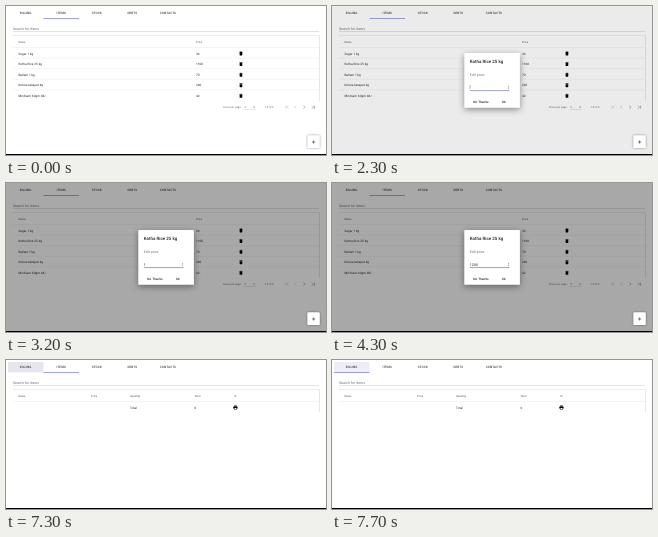
These frames come from a looping animation (320x149 px, 8 s). An HTML page:

```html
<!DOCTYPE html>
<html lang="en">
<head>
<meta charset="utf-8">
<title>Shop items</title>
<style>
  html, body { margin: 0; width: 100%; height: 100%; overflow: hidden; background: #fff; }
  svg { display: block; width: 100%; height: 100%; }
  text { font: 400 3.11px Roboto, Arial, sans-serif; fill: #212121; text-rendering: geometricPrecision; white-space: pre; }
  .tabs text { font-weight: 500; letter-spacing: .06px; text-anchor: middle; fill: #444; }
  .head text { font-size: 2.67px; font-weight: 500; fill: #6c6c6c; }
  .pager text { font-size: 2.67px; fill: #666; }
  .body text { letter-spacing: .03px; }
  .large { font-size: 3.55px; fill: #6f6f6f; }
  .title { font-size: 4.44px; font-weight: 500; }
  .button { font-weight: 500; letter-spacing: .06px; }
  .rule { stroke: #dedede; stroke-width: .3; fill: none; }
  .card { fill: #fff; filter: drop-shadow(0 .6px .7px rgba(0,0,0,.38)); }
  .fab { fill: #fff; filter: drop-shadow(0 .8px 1px rgba(0,0,0,.42)); }
  .paper { fill: #fff; filter: drop-shadow(0 2px 3px rgba(0,0,0,.4)); }

  .items, .billing, .backdrop, .dialog, .caret, .old, .new, .hover, .key { animation: 8s step-end infinite; }
  .items { animation-name: items; }
  .billing { animation-name: billing; }
  .backdrop { animation-name: dim; }
  .dialog { animation-name: dialog; }
  .caret { animation-name: caret; }
  .old { animation-name: old; }
  .new { animation-name: new; }
  .hover { animation-name: hover; }
  .key1 { animation-name: key1; }
  .key2 { animation-name: key2; }
  .key3 { animation-name: key3; }
  .key4 { animation-name: key4; }
  .marker { animation: slide 8s linear infinite; }

  @keyframes items { 0% { opacity: 1 } 91.25%, 100% { opacity: 0 } }
  @keyframes billing { 0% { opacity: 0 } 91.25%, 100% { opacity: 1 } }
  @keyframes dim {
    0% { opacity: 0 } 28.75% { opacity: .08 } 30% { opacity: .3 }
    31.25% { opacity: .33 } 32.5% { opacity: .34 } 57.5%, 100% { opacity: 0 }
  }
  @keyframes dialog { 0% { opacity: 0 } 28.75% { opacity: 1 } 57.5%, 100% { opacity: 0 } }
  @keyframes caret { 0% { opacity: 1 } 40%, 100% { opacity: 0 } }
  @keyframes old { 0% { opacity: 1 } 57.5%, 100% { opacity: 0 } }
  @keyframes new { 0% { opacity: 0 } 57.5%, 100% { opacity: 1 } }
  @keyframes key1 { 0% { visibility: hidden } 40%, 100% { visibility: visible } }
  @keyframes key2 { 0% { visibility: hidden } 46.25%, 100% { visibility: visible } }
  @keyframes key3 { 0% { visibility: hidden } 51.25%, 100% { visibility: visible } }
  @keyframes key4 { 0% { visibility: hidden } 53.75%, 100% { visibility: visible } }
  @keyframes hover {
    0% { fill: #fff } 91.25% { fill: #e6e6ee } 92.5% { fill: #e7e8f1 }
    95% { fill: #eaebf5 } 96.25%, 100% { fill: #ecedf6 }
  }
  @keyframes slide {
    0% { transform: none }
    91.25% { transform: none; animation-timing-function: cubic-bezier(.4,0,.2,1) }
    95%, 100% { transform: translateX(-35.6px) }
  }
</style>
</head>
<body>
<svg viewBox="0 0 320 149" preserveAspectRatio="none">
  <defs>
    <symbol id="trash" viewBox="0 0 24 24">
      <path d="M6 19c0 1.1.9 2 2 2h8c1.1 0 2-.9 2-2V7H6zM19 4h-3.5l-1-1h-5l-1 1H5v2h14z"/>
    </symbol>
    <symbol id="print" viewBox="0 0 24 24">
      <path d="M19 8H5c-1.7 0-3 1.3-3 3v6h4v4h12v-4h4v-6c0-1.7-1.3-3-3-3zm-3 11H8v-5h8zM18 3H6v4h12z"/>
    </symbol>
  </defs>
  <rect width="320" height="149" fill="#fff"/>

  <g class="tabs">
    <rect class="hover" x="2" y="2" width="35.5" height="10.3"/>
    <text x="19.6" y="8.2">BILLING</text>
    <text x="55.2" y="8.2">ITEMS</text>
    <text x="90.8" y="8.2">STOCK</text>
    <text x="126.3" y="8.2">DEBTS</text>
    <text x="161.9" y="8.2">CONTACTS</text>
    <rect class="marker" x="37.4" y="12" width="35.6" height=".5" fill="#3f51b5"/>
  </g>
  <text class="large" x="7" y="24">Search for items</text>
  <path d="M7 25.7H313" stroke="#888" stroke-width=".3"/>

  <g class="items">
    <rect class="card" x="7" y="29.3" width="306.5" height="65.7" rx=".8"/>
    <g class="head">
      <text x="12.4" y="37">Name</text>
      <text x="190" y="37">Price</text>
    </g>
    <g class="body" id="rows"></g>
    <g class="pager">
      <text x="217.3" y="102.2">Rows per page:</text>
      <text x="238.5" y="102.2">5</text>
      <path d="M247 100.7h2.2l-1.1 1.1z" fill="#666"/>
      <path d="M237.5 103.7H250" stroke="#999" stroke-width=".3"/>
      <text x="258.6" y="102.2">1-5 of 6</text>
      <g fill="none" stroke-width=".45">
        <path d="M279.8 99.7v3M282.4 99.7l-1.5 1.5 1.5 1.5M290 99.7l-1.5 1.5 1.5 1.5" stroke="#aaa"/>
        <path d="M297.5 99.7l1.5 1.5-1.5 1.5M306 99.7l1.5 1.5-1.5 1.5M308.6 99.7v3" stroke="#555"/>
      </g>
    </g>
  </g>

  <g class="billing">
    <rect class="card" x="7" y="29.3" width="306.5" height="22.7" rx=".8"/>
    <g class="head">
      <text x="12.4" y="37">Name</text>
      <text x="85" y="37">Price</text>
      <text x="124" y="37">Quantity</text>
      <text x="188.5" y="37">Total</text>
    </g>
    <path d="M228.3 35l2 2m0-2l-2 2" stroke="#666" stroke-width=".4"/>
    <path class="rule" d="M7 41.5H313.5"/>
    <g class="body">
      <text x="124" y="48.6" font-weight="500">Total</text>
      <text x="188.5" y="48.6">0</text>
    </g>
    <use href="#print" x="226.8" y="44.8" width="5.3" height="5.3"/>
  </g>

  <rect class="backdrop" width="320" height="148"/>
  <g class="items">
    <rect class="fab" x="301.3" y="129.3" width="12.5" height="12.8" rx="1.2"/>
    <path d="M306 136h3.2m-1.6-1.6v3.2" stroke="#222" stroke-width=".55"/>
  </g>

  <g class="dialog">
    <rect class="paper" x="132.3" y="47" width="55.6" height="54.8" rx=".9"/>
    <text class="title" x="137.8" y="57.4">Kotha Rice 25 kg</text>
    <text class="large" x="137.8" y="70">Edit price</text>
    <path class="caret" d="M138 79v4.2" stroke="#222" stroke-width=".35"/>
    <text x="137.8" y="82.6" style="font-size:3.55px"><tspan class="key key1">1</tspan><tspan class="key key2">2</tspan><tspan class="key key3">0</tspan><tspan class="key key4">0</tspan></text>
    <path d="M175.8 80.6l.7-.9.7.9zM175.8 81.8l.7.9.7-.9z" fill="#555"/>
    <path d="M137.8 84.6H177.5" stroke="#3f4a80" stroke-width=".5"/>
    <text class="button" x="141.3" y="96.6">No Thanks</text>
    <text class="button" x="169.8" y="96.6">Ok</text>
  </g>
  <rect y="148" width="320" height="1"/>
</svg>
<script>
  const items = [
    ["Sugar 1 kg", 34],
    ["Kotha Rice 25 kg", 1100, 1200],
    ["Ballam 1 kg", 70],
    ["Kolara katapat kg", 240],
    ["Minfoam 60gm 48/-", 42]
  ];
  const price = (value, y, cls = "") => `<text class="${cls}" x="190" y="${y}">${value}</text>`;

  document.getElementById("rows").innerHTML = items.map(([name, cost, changed], i) => {
    const y = 48.6 + i * 10.6;
    const cells = changed ? price(cost, y, "old") + price(changed, y, "new") : price(cost, y);
    return `<path class="rule" d="M7 ${y - 7.1}H313.5"/>
      <text x="12.4" y="${y}">${name}</text>${cells}
      <use href="#trash" x="232.3" y="${y - 3.8}" width="5.3" height="5.3"/>`;
  }).join("");
</script>
</body>
</html>
```
